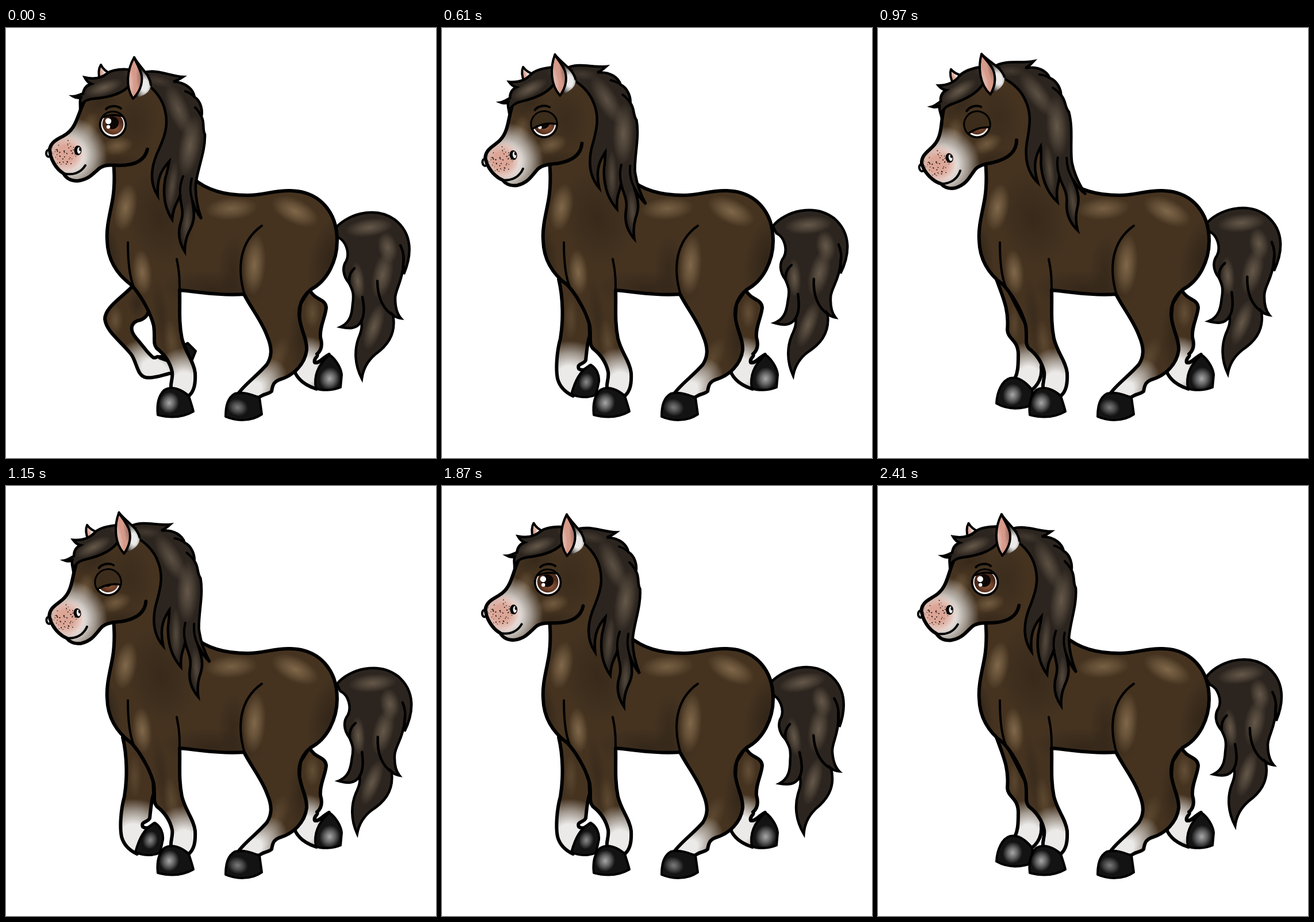
An HTML page for the animation above (2590 ms loop, 748 by 748 pixels).

```html
<!DOCTYPE html>
<html lang="en">
<head>
<meta charset="utf-8">
<title>Trotting pony</title>
<style>
html, body { margin: 0; width: 100%; height: 100%; overflow: hidden; background: #fff; }
svg { display: block; width: 100vw; height: 100vh; }
.line { fill: none; stroke: #000; stroke-width: 6; stroke-linecap: round; stroke-linejoin: round; }
.thin { stroke-width: 4; }
.hair { stroke-width: 4.5; stroke-linejoin: miter; stroke-miterlimit: 6; }
</style>
</head>
<body>
<svg id="stage" viewBox="0 0 748 748"></svg>
<script>
const BROWN = '#453320', HAIR = '#2c251f';
const tones = {
  light: ['#80684a', 0], dark: ['#2a2016', 0], sheen: ['#655849', 0], grey: ['#a8a8a8', 0],
  white: ['#eceae8', 0.35], pink: ['#dca596', 0.4], iris: ['#8a5539', 0.1]
};
let clips = 0;

const gradient = ([id, [color, hold]]) => `<radialGradient id="${id}">
  <stop offset="${hold}" stop-color="${color}"/>
  <stop offset="${hold + (1 - hold) * 0.5}" stop-color="${color}" stop-opacity=".55"/>
  <stop offset="1" stop-color="${color}" stop-opacity="0"/></radialGradient>`;

const glow = (tone, x, y, rx, ry, turn = 0, alpha = 1) =>
  `<ellipse rx="${rx}" ry="${ry}" transform="translate(${x} ${y}) rotate(${turn})" fill="url(#${tone})" opacity="${alpha}"/>`;

const line = (d, cls = '') => `<path class="line ${cls}" d="${d}"/>`;

// Filled shape with clipped shading; the outline may differ from the fill.
function shape(d, fill, shading = '', cls = '', outline = d) {
  const id = 'clip' + clips++;
  return `<clipPath id="${id}"><path d="${d}"/></clipPath><path d="${d}" fill="${fill}"/>
    <g clip-path="url(#${id})">${shading}</g>${line(outline, cls)}`;
}

const hoof = (d, x, y, rx = 17, ry = 19, alpha = 1) =>
  shape(d, '#131313', glow('grey', x, y, rx, ry, 15, alpha), 'thin');

function tail() {
  const d = `M570,352 C590,325 640,308 676,333 C708,358 706,395 692,428 C693,420 692,415 691,412
    C690,440 677,455 677,470 C677,485 680,497 687,505 C680,504 676,502 673,499
    C680,535 660,555 642,568 C628,580 621,595 619,610 C606,585 606,560 613,540
    C618,528 620,520 618,510 C610,525 595,523 582,520 C600,512 602,495 603,480
    C606,460 602,455 597,444 C585,430 585,415 592,405 C598,392 592,370 577,364 Z`;
  return shape(d, HAIR,
    glow('sheen', 632, 347, 42, 16, -8) + glow('sheen', 664, 382, 17, 28, -12) +
    glow('sheen', 655, 430, 18, 42, 12) + glow('sheen', 612, 440, 12, 34, -6) +
    glow('sheen', 640, 520, 15, 42, 18), 'hair') +
    line('M620,468 C624,490 623,502 617,512 M646,440 C646,468 656,490 674,500 M597,444 C596,430 600,424 606,418 M691,412 C693,400 691,388 686,378', 'hair thin');
}

function farHind() {
  const d = `M528,455 C537,474 555,470 557,486 C556,502 545,520 547,538 C552,555 546,563 541,567
    C545,572 534,574 537,582 C545,584 550,574 562,568 L570,610 L540,628
    C522,622 510,614 503,600 L512,480 Z`;
  return shape(d, BROWN,
    glow('light', 533, 495, 14, 28, 0, .5) + glow('white', 521, 596, 54, 60)) +
    hoof('M562,568 C574,576 583,592 584,603 L582,625 C568,631 550,631 539,627 C535,605 542,588 562,568 Z', 563, 610, 18, 20);
}

const farFront = [
  () => hoof('M262,572 C285,570 300,558 316,548 L330,562 L322,582 L280,592 Z', 290, 572, 1, 1) +
    shape(`M222,447 C205,467 172,485 172,506 C174,528 200,545 218,568 C228,582 228,606 244,608
      C260,610 275,602 290,600 L285,580 L268,574 C262,568 262,576 256,573
      C246,566 238,552 226,539 C212,522 220,510 234,508 C242,505 246,500 248,493 L240,460 Z`, BROWN,
      glow('light', 190, 508, 14, 26, 0, .55) + glow('dark', 228, 480, 16, 26, 0, .6) +
      glow('white', 260, 596, 70, 48, 30)),
  () => shape(`M203,437 C211,470 211,510 206,540 C199,565 198,595 201,610 C205,625 215,634 228,640
      L262,600 L258,587 C252,592 246,598 238,593 C234,583 246,586 250,578
      C252,560 253,545 257,535 L256,505 L222,447 Z`, BROWN,
      glow('light', 224, 505, 12, 38, 0, .35) + glow('white', 222, 612, 72, 68)) +
    hoof('M259,586 C269,592 274,604 273,615 L268,638 C255,644 238,643 225,637 C232,612 240,596 259,586 Z', 251, 616, 13, 16, .8),
  () => shape(`M206,437 C218,470 228,490 225,525 C226,542 244,542 244,568 C244,590 243,600 238,610
      L264,632 C280,622 286,605 284,590 L288,560 L257,515 L222,447 Z`, BROWN,
      glow('light', 237, 515, 10, 34, 0, .35) + glow('white', 263, 612, 60, 66)) +
    hoof('M230,609 C244,606 256,615 268,629 C270,638 266,650 262,658 C242,664 222,662 206,653 C207,632 216,613 230,609 Z', 234, 638)
];

function body() {
  const d = `M187,232 C189,255 189,275 186,295 C182,320 174,345 176,370 C177,405 195,430 218,447
    C232,462 250,490 257,518 C260,540 255,548 262,557 C275,567 285,580 289,598 C291,612 284,620 288,630
    L318,640 C327,632 330,620 329,600 C327,580 312,565 306,540 C300,510 303,485 302,456
    C335,459 375,466 414,463 C428,490 445,510 454,535 C464,558 462,572 454,585
    C440,602 415,620 404,636 L440,643 C448,636 455,638 462,632 C464,620 466,616 475,612
    C500,605 520,585 523,560 C524,540 512,525 510,500 C509,480 518,465 530,455
    C559,440 576,405 576,370 C576,320 545,284 495,283 C465,282 450,291 420,291 C385,291 350,283 326,262`;
  const shading =
    glow('dark', 565, 400, 38, 80, 15, .7) + glow('dark', 360, 455, 90, 34, 4, .6) +
    glow('dark', 270, 330, 60, 85, -15, .5) + glow('dark', 180, 390, 20, 60, -10, .6) +
    glow('dark', 395, 420, 26, 60, 0, .5) + glow('dark', 515, 540, 24, 70, 0, .6) +
    glow('dark', 270, 500, 14, 70, -8, .4) +
    glow('light', 208, 312, 20, 42, 10) + glow('light', 392, 314, 46, 20, -4, .85) +
    glow('light', 503, 319, 44, 22, 25) + glow('light', 432, 412, 20, 54, 4) +
    glow('light', 237, 425, 17, 40, -5) + glow('light', 470, 575, 18, 40, 25, .4) +
    glow('light', 288, 545, 14, 40, -8, .4) +
    glow('white', 310, 622, 60, 66) + glow('white', 420, 638, 82, 46, -40);
  return `<path d="M187,234 L235,205 L255,170 L325,190 L326,262 Z" fill="${BROWN}"/>` + shape(d, BROWN, shading) +
    line('M212,373 C212,405 214,430 222,450 M297,402 C302,425 302,440 302,458', 'thin') +
    line('M445,344 C405,372 402,420 415,464', 'thin') +
    hoof('M275,630 C288,622 305,628 318,640 C321,650 324,658 326,667 C305,679 283,678 264,673 C262,655 265,640 275,630 Z', 284, 652) +
    hoof('M398,636 C414,632 428,638 441,643 L445,672 C426,685 400,684 382,676 C382,656 386,643 398,636 Z', 403, 660, 18, 15, .7);
}

function mane() {
  const d = `M238,78 C262,70 285,84 308,85 C302,89 297,92 291,93 C315,95 326,108 328,120
    C340,128 342,145 340,154 C346,165 341,176 346,185 C347,215 333,245 330,272
    C329,295 335,318 340,332 C332,322 327,310 324,300 C330,330 326,340 318,355
    C312,368 311,380 311,389 C299,370 299,352 305,335 C310,318 303,305 303,290
    C298,305 291,310 289,333 C274,310 273,285 277,262 C280,250 282,245 284,232
    C272,245 262,260 264,292 C250,270 252,245 262,220 C276,190 283,170 277,145
    C272,120 255,105 243,95 Z`;
  return shape(d, HAIR,
    glow('sheen', 300, 142, 18, 48, -22, .85) + glow('sheen', 320, 205, 19, 54, 10) +
    glow('sheen', 289, 275, 9, 45, 8, .7) + glow('sheen', 315, 340, 9, 38, 5, .7) +
    glow('sheen', 265, 92, 26, 10, 15, .4), 'hair') +
    line('M303,290 C302,278 304,268 308,258 M324,300 C320,285 320,275 323,262 M328,120 C322,114 318,112 312,110 M340,154 C336,146 333,142 329,138', 'thin');
}

function forelock() {
  const d = `M246,82 C225,68 188,70 176,79 C165,88 150,89 137,86 C140,92 143,95 148,97
    C138,100 135,108 134,114 C128,116 122,119 117,119 C122,122 126,122 130,121
    C128,126 129,131 129,137 C134,127 142,124 152,123 C178,121 205,114 216,98 Z`;
  return shape(d, HAIR, glow('sheen', 170, 104, 34, 13, -18) + glow('sheen', 222, 80, 20, 8, 0, .3), 'hair');
}

function speckles() {
  let seed = 11, out = '';
  const rnd = () => (seed = seed * 16807 % 2147483647) / 2147483647;
  for (let i = 0; i < 60; i++) {
    const a = rnd() * 2 * Math.PI, r = 23 * Math.sqrt(rnd());
    out += `<circle cx="${101 + r * Math.cos(a)}" cy="${217 + r * Math.sin(a)}" r="${0.45 + rnd() * 0.65}" fill="#1c1210"/>`;
  }
  return out;
}

function eye() {
  return `<g id="eye"><clipPath id="socket"><circle r="22.5"/></clipPath>
    <g clip-path="url(#socket)"><circle r="23" fill="#000"/><circle r="20.5" fill="#fff"/>
    <circle cy="-1" r="18.5" fill="#4d2a1b"/>${glow('iris', 3, 6, 17, 13)}
    <circle cx="-1" cy="-3" r="11" fill="#0c0705"/><circle cx="-8" cy="-6" r="5.2" fill="#fff"/>
    <circle cx="-8" cy="4" r="3.2" fill="#fff"/>
    <path id="lid" fill="#3c2c1b" stroke="#000" stroke-width="3.5"/></g>
    <circle class="line" r="22.8" style="stroke-width:3"/></g>` +
    line('M174,141 C180,135 193,134 200,140', 'thin');
}

function head() {
  const face = `M246,211 C241,232 222,239 198,239 C182,238 172,238 164,243 C152,252 145,264 124,266
    C110,266 104,260 100,253 C88,246 76,228 76,210 C80,194 96,192 107,183 C124,170 126,145 139,122`;
  const shading =
    glow('dark', 225, 165, 40, 60, 0, .35) + glow('dark', 190, 232, 50, 14, -4, .5) + glow('dark', 165, 130, 40, 20, -10, .5) +
    glow('light', 194, 205, 28, 16, -10, .75) + glow('light', 145, 172, 16, 26, 20, .6) +
    glow('white', 110, 222, 66, 68) + glow('pink', 103, 219, 36, 36);
  const ear = 'M223,51 C234,70 250,80 252,99 C251,114 236,119 221,123 L236,85 Z';
  const inner = 'M223,51 C211,72 207,102 221,123 C231,112 238,100 236,83 C233,70 227,62 223,51 Z';
  return shape('M165,64 C160,72 161,82 163,90 L183,80 C176,77 169,72 165,64 Z', '#eceae8', glow('pink', 163, 82, 9, 22), 'thin') +
    `<ellipse class="line thin" cx="74" cy="218" rx="4" ry="6" fill="#777"/>` +
    shape(face + ' L215,95 L260,100 L290,140 L285,232 L262,228 Z', BROWN, shading, '', face) +
    speckles() +
    line('M138,239 C130,252 116,257 100,253', 'thin') +
    `<ellipse cx="125" cy="213" rx="6.5" ry="8.5"/><ellipse cx="127" cy="213" rx="3.2" ry="5.8" fill="#eee"/><ellipse cx="129" cy="211" rx="2" ry="3" fill="#111"/>` +
    mane() + forelock() +
    shape(ear, HAIR, glow('white', 241, 100, 18, 28), 'thin', 'M223,51 C234,70 250,80 252,99') +
    shape(inner, '#d79a8a', glow('white', 216, 98, 7, 28, 0, .3) + glow('dark', 233, 84, 7, 32, 0, .3), 'thin') +
    eye();
}

const stage = document.getElementById('stage');
stage.innerHTML = `<defs>${Object.entries(tones).map(gradient).join('')}</defs>
  <g id="tail">${tail()}</g>${farHind()}
  ${farFront.map((leg, i) => `<g id="leg${i}">${leg()}</g>`).join('')}
  ${body()}<g id="head">${head()}</g>`;

// head angle, lid height, far leg, tail angle, tail x, tail y, eye shift
const poses = [
  [0, -16, 0, 0, 0, 0],
  [-3, -10, 0, -3.3, -2, -3],
  [-6, -4, 1, -0.5, 4, -4],
  [-8.7, 0, 1, 3, 5.5, -7],
  [-11.5, 4, 2, 2.6, 2, -9],
  [-14, 8, 2, 2.3, 0, -10],
  [-8.7, 5, 1, 3, 5.5, -7],
  [-6, 0, 1, -0.5, 4, -4],
  [-3, -6, 0, -3.3, -2, -3],
  [0, -12, 0, 0, 0, 0],
  [-2, -16, 1, -3.4, -5, -2],
  [-4.3, -16, 1, -0.5, 0, -5],
  [-6.5, -16, 2, 1, 5, -12],
  [-2.7, -16, 2, -0.5, 0, -18.5, 2.6]
];
const LOOP = 2590, FIRST = 250, STEP = 180;
const $ = id => document.getElementById(id);
const set = (id, name, value) => $(id).setAttribute(name, value);
let shown = -1;

function draw(now) {
  const t = now % LOOP;
  const step = t < FIRST ? 0 : Math.min(13, 1 + Math.floor((t - FIRST) / STEP));
  if (step !== shown) {
    shown = step;
    const [turn, lid, leg, swing, x, y, shift = 0] = poses[step];
    set('head', 'transform', `rotate(${turn} 178 223)`);
    set('tail', 'transform', `translate(${x} ${y}) rotate(${swing} 578 350)`);
    set('eye', 'transform', `translate(${186 + shift} 168)`);
    set('lid', 'd', `M-24,${lid + 6} Q1,${lid - 6} 24,${lid + 4} V-30 H-24 Z`);
    farFront.forEach((_, i) => set('leg' + i, 'display', i === leg ? 'inline' : 'none'));
  }
}

let start;
function tick(now) {
  start ??= now;
  draw(now - start);
  requestAnimationFrame(tick);
}
draw(0);
requestAnimationFrame(tick);
</script>
</body>
</html>
```
